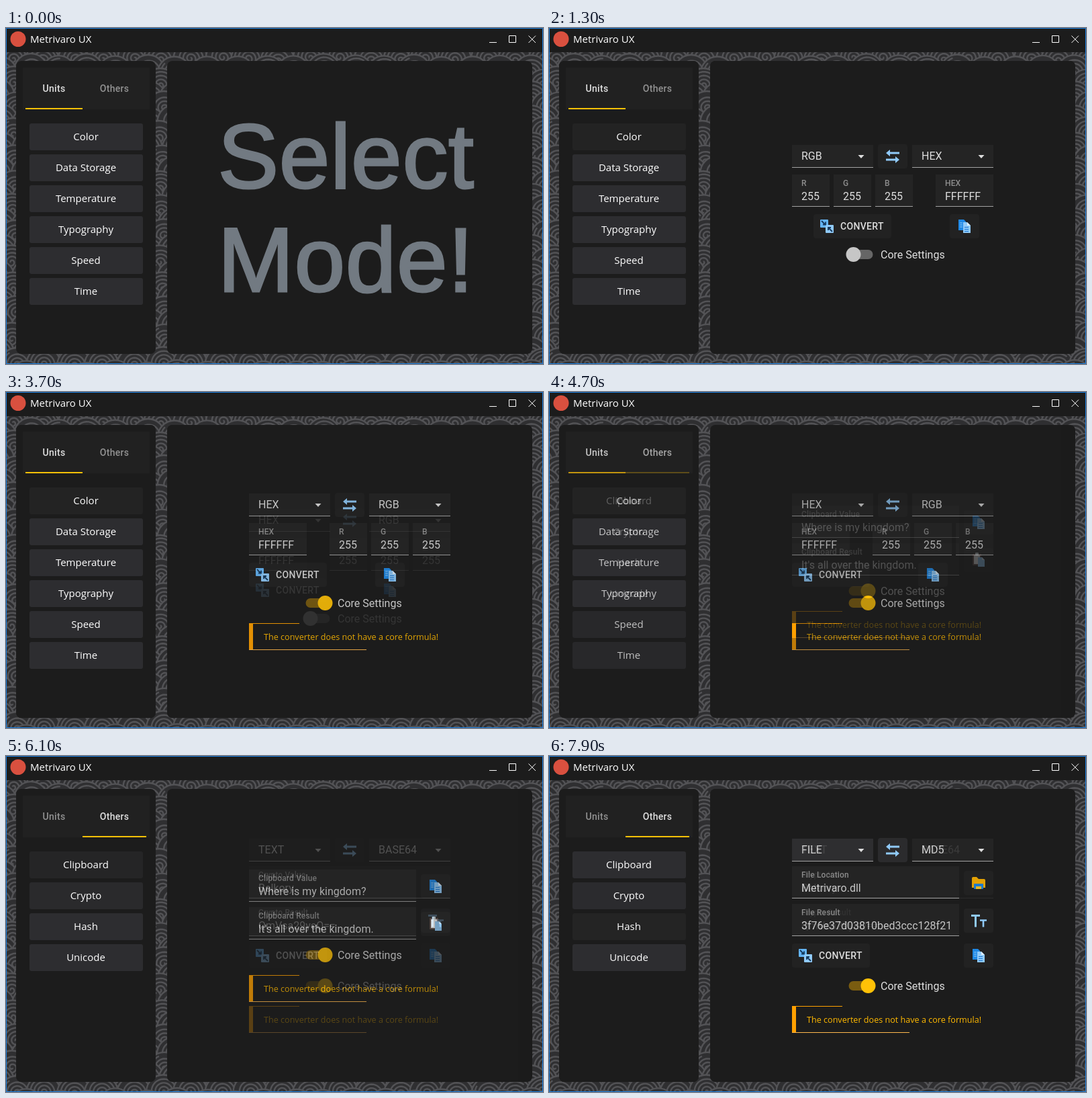
An HTML page with a canvas for the animation above (8 s loop, 800 px wide and 500 px high).

```html
<!DOCTYPE html>
<html lang="en">
<head>
<meta charset="utf-8">
<title>Converter demo</title>
<style>
  html, body { margin: 0; width: 100%; height: 100%; overflow: hidden; background: #1c1c1c; }
  canvas, svg { position: absolute; left: 0; top: 0; }
  text { white-space: pre; }
  .ui { font: 15px "Open Sans", "Noto Sans", sans-serif; fill: #fff; }
  .note { font: 12.6px "Open Sans", "Noto Sans", sans-serif; fill: #ffb900; }
  .body { font: 16px Roboto, sans-serif; fill: #dedede; }
  .label { font: 500 12px Roboto, sans-serif; fill: #8f8f8f; letter-spacing: .15px; }
  .strong { font: 500 14px Roboto, sans-serif; fill: #dedede; letter-spacing: .3px; }
  .dim { fill: #929292; }
  .hero { font: 136px "Liberation Sans", Arial, sans-serif; letter-spacing: .7px;
          fill: #727a82; stroke: #727a82; stroke-width: 3; }
  .mid { text-anchor: middle; }
</style>
</head>
<body>
<canvas id="waves" width="800" height="500"></canvas>
<svg id="stage" width="800" height="500" viewBox="0 0 800 500"></svg>
<script>
const SKY = '#90caf9', BLUE = '#1e88e5', GOLD = '#ffc107';

const rect = (x, y, w, h, fill, r = 0) =>
  `<rect x="${x}" y="${y}" width="${w}" height="${h}" rx="${r}" fill="${fill}"/>`;
const text = (x, y, s, cls) => `<text x="${x}" y="${y}" class="${cls}">${s}</text>`;
const path = (d, fill) => `<path d="${d}" fill="${fill}"/>`;
const line = (d, color, w) => `<path d="${d}" fill="none" stroke="${color}" stroke-width="${w}"/>`;

// Icons are drawn around the centre of a 44 x 36 button.
const icons = {
  swap: path('M-10-5l6-5v3.500h14v3h-14v3.500zM10 5l-6-5v3.500h-14v3h14v3.500z', SKY),
  copy: path('M-9-10h8l3 3v13h-11z', BLUE) + path('M-2-6h6l5 5v11h-11z', SKY) +
    path('M4-6v5h5z', '#e1f0fd') +
    line('M0 1.500h6M0 4.500h6M0 7.500h6', '#1976d2', 1) + line('M-7-5h4M-7-2h4M-7 1h4', SKY, 1),
  paste: rect(-9, -9, 13, 17, '#5d4a45', 1) + rect(-7, -7, 9, 13, '#f2f2f2') +
    rect(-5, -11, 5, 4, '#cfd8dc', 1) + path('M-1-4h6l4 4v10h-10z', SKY) + path('M5-4v4h4z', '#e1f0fd'),
  folder: path('M-10-7q0-2 2-2h5l3 3h8q2 0 2 2v11h-20z', '#ffb300') +
    rect(-7, 1, 14, 8, BLUE, 1) + rect(-4, 5, 8, 4, '#ffca28'),
  type: line('M-11-7.500h13M-4.500-7.500v17', SKY, 3) + line('M2-.5h10M7-.5v10', SKY, 2.6),
  merge: rect(-10, -10, 12, 12, '#64b5f6', 1) + rect(-2, -2, 12, 12, SKY, 1) +
    line('M-8-8l6 6M-6-2.500h4v-4M8 8l-6-6M2 6v-4h4', '#15395c', 1.8)
};
const icon = (name, x, y) => `<g transform="translate(${x} ${y})">${icons[name]}</g>`;

const button = (name, x, y, fill = '#222') => rect(x, y, 44, 36, fill, 4) + icon(name, x + 22, y + 18);
const convert = (x, y) => rect(x, y, 116, 36, '#222', 4) + icon('merge', x + 20, y + 18) +
  text(x + 40, y + 23, 'CONVERT', 'strong');
const combo = (x, y, s, fill = '#242424') => rect(x, y, 121, 33, fill) + rect(x, y + 33, 121, 1, '#a2a2a2') +
  text(x + 14, y + 22, s, 'body') + path(`M${x + 98.5} ${y + 15}h9l-4.500 5z`, '#dedede');
const combos = (y, a, b, fillA, fillSwap) =>
  combo(362, y, a, fillA) + button('swap', 490, y - 1, fillSwap) + combo(541, y, b);
const field = (x, y, w, name, value) => rect(x, y, w, 47, '#242424') + rect(x, y + 47, w, 1, '#a2a2a2') +
  text(x + 14, y + 17, name, 'label') + text(x + 14, y + 38, value, 'body');
const rgb = (x, y) => ['R', 'G', 'B'].map((c, i) => field(x + 62 * i, y, 56, c, '255')).join('');
const toggle = (y, on) => rect(446.5, y - 7, 36, 14, on ? '#7a5c10' : '#666', 7) +
  `<circle cx="${on ? 475.5 : 453.5}" cy="${y}" r="11" fill="${on ? GOLD : '#c6c6c6'}"/>` +
  text(494, y + 6, 'Core Settings', 'body');
const warning = y => rect(362, y, 6, 40, '#ffa000') + rect(362, y, 75, 1, '#ffa000') +
  rect(362, y + 39, 175, 1, '#ffb84d') + text(384, y + 25, 'The converter does not have a core formula!', 'note');

const menus = [
  ['Color', 'Data Storage', 'Temperature', 'Typography', 'Speed', 'Time'],
  ['Clipboard', 'Crypto', 'Hash', 'Unicode']
];
const scene = (tab, picked, content) => '<g>' +
  rect(15, 49, 208, 436, '#1c1c1c', 8) + rect(240, 49, 544, 436, '#1c1c1c', 8) +
  rect(25, 59, 189, 62, '#212121') + rect(29 + 85 * tab, 119, tab ? 95 : 85, 2, GOLD) +
  text(71.5, 95, 'Units', 'strong mid' + (tab ? ' dim' : '')) +
  text(161.5, 95, 'Others', 'strong mid' + (tab ? '' : ' dim')) +
  menus[tab].map((s, i) => rect(35, 142 + 46 * i, 169, 40, i === picked ? '#232323' : '#2d2d30', 3) +
    text(119, 167 + 46 * i, s, 'ui mid')).join('') +
  content + '</g>';

const hexToRgb = y => combos(y, 'HEX', 'RGB') + field(362, y + 44, 86, 'HEX', 'FFFFFF') +
  rgb(482, y + 44) + convert(362, y + 103) + button('copy', 550, y + 103);
const finish = convert(362, 279) + button('copy', 618, 279) + toggle(342, true) + warning(372);

const scenes = [
  scene(0, -1, text(315.4, 238, 'Select', 'hero') + text(315.4, 391.5, 'Mode!', 'hero')),
  scene(0, 0, combos(174, 'RGB', 'HEX') + rgb(362, 218) + field(576, 218, 86, 'HEX', 'FFFFFF') +
    convert(394, 277) + button('copy', 597, 277) + toggle(337, false)),
  scene(0, 0, hexToRgb(174) + toggle(337, false)),
  scene(0, 0, hexToRgb(151) + toggle(314, true) + warning(344)),
  scene(1, 0, field(362, 169, 249, 'Clipboard Value', 'Where is my kingdom?') + button('copy', 618, 176) +
    field(362, 225, 249, 'Clipboard Result', "It's all over the kingdom.") + button('paste', 618, 232) +
    toggle(296, true) + warning(326)),
  scene(1, 1, combos(123, 'TEXT', 'BASE64') + field(362, 164, 300, 'Crypto Value', 'Belkory') +
    field(362, 220, 249, 'Crypto Result', 'QmVsa29yeQ==') + button('type', 618, 227, '#2d2d2f') + finish),
  scene(1, 2, combos(123, 'FILE', 'MD5', '#303032', '#2d2d2f') +
    field(362, 164, 249, 'File Location', 'Metrivaro.dll') + button('folder', 618, 171) +
    field(362, 220, 249, 'File Result', '3f76e37d03810bed3ccc128f21') + button('type', 618, 227) + finish)
];

const frame = rect(0, 0, 800, 36, '#1c1c1c') +
  '<circle cx="18" cy="16.500" r="11.500" fill="#d9503f"/>' + text(36, 22, 'Metrivaro UX', 'ui') +
  line('M720 21.500h11M749.500 11.500h10v10h-10zM778.500 11.500l10.500 10.500M789 11.500l-10.500 10.500', '#fff', 1) +
  line('M.5.5h799v499h-799z', '#1a7fe0', 1);

// Backdrop: overlapping discs, each holding a spiral.
function drawWaves() {
  const c = document.getElementById('waves').getContext('2d');
  let seed = 7;
  const random = () => (seed = seed * 16807 % 2147483647) / 2147483647;
  c.fillStyle = '#2f2f31';
  c.strokeStyle = '#535356';
  c.lineWidth = 2.4;
  c.fillRect(0, 0, 800, 500);
  for (let row = 0; row < 28; row++) {
    for (let col = 0; col < 20; col++) {
      const x = col * 44 + row % 2 * 22 + random() * 8 - 14, y = 24 + row * 19 + random() * 6;
      const turn = random() * 2 * Math.PI;
      c.beginPath();
      c.arc(x, y, 25, 0, 2 * Math.PI);
      c.fill();
      c.stroke();
      c.beginPath();
      for (let a = 0; a < 22; a += 0.2) {
        const r = 1 + a * 0.9;
        c.lineTo(x + r * Math.cos(a + turn), y + r * Math.sin(a + turn));
      }
      c.stroke();
    }
  }
}

const stage = document.getElementById('stage');
stage.innerHTML = scenes.join('') + frame;
const layers = [...stage.children].slice(0, scenes.length);
drawWaves();

const LOOP = 8000, FIRST = 500, PERIOD = 1400, STEP = 100;

function draw() {
  const t = performance.now() % LOOP;
  const shown = Math.floor((t - FIRST) / PERIOD) + 1;
  const step = Math.min(10, Math.floor((t - FIRST - PERIOD * (shown - 1)) / STEP) + 1);
  const fade = shown ? 1 - (1 - step / 10) ** 3 : 1;
  layers.forEach((layer, i) => {
    layer.style.display = i === shown || i === shown - 1 ? '' : 'none';
    layer.style.opacity = i === shown ? fade : 1;
  });
  requestAnimationFrame(draw);
}
draw();
</script>
</body>
</html>
```
